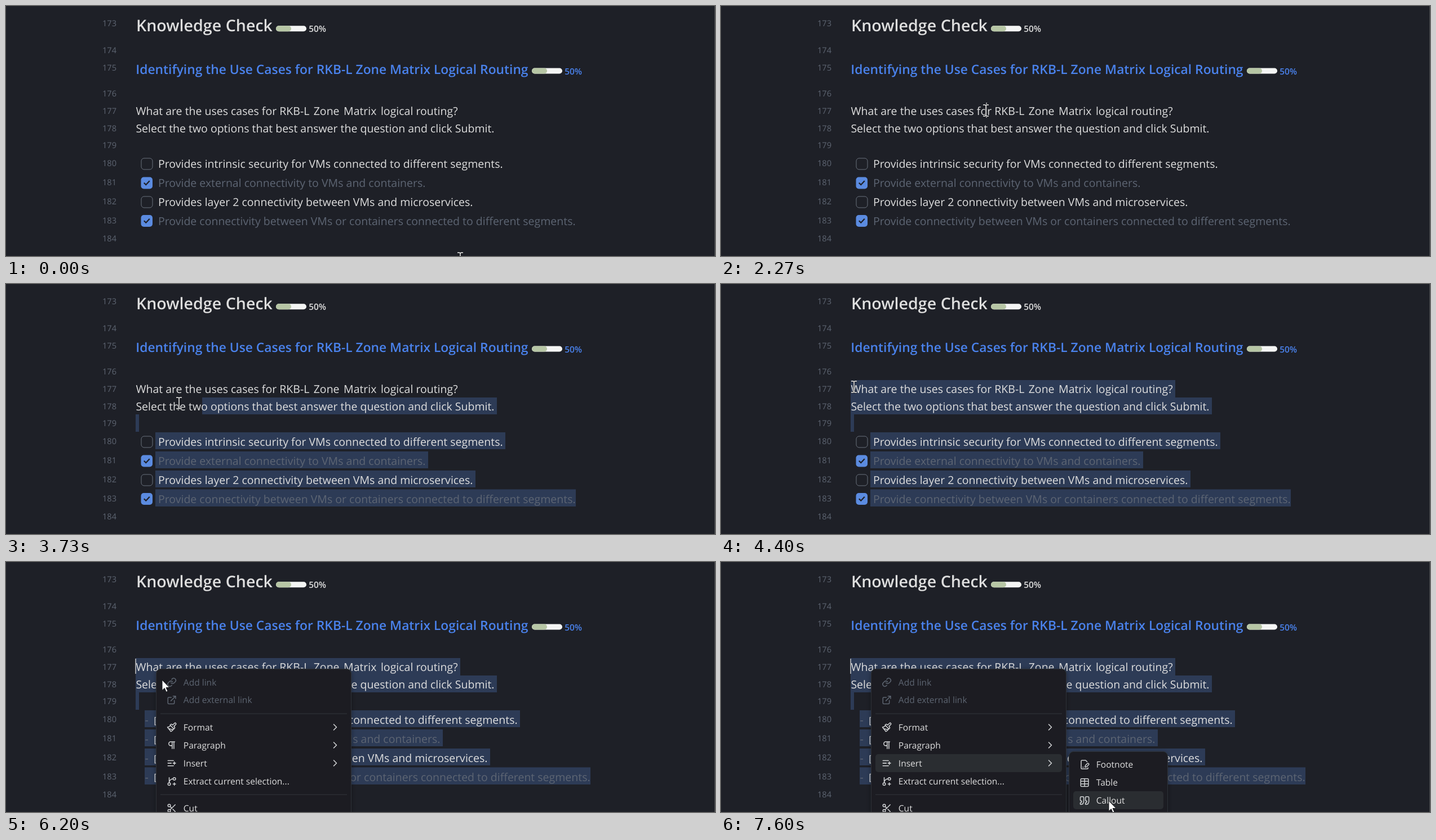
Write an HTML page that moves like this. It is 1258 by 445 pixels and loops after 8000 ms.

```html
<!DOCTYPE html>
<html lang="en">
<head>
<meta charset="utf-8">
<title>Knowledge check notes</title>
<style>
  html, body { margin: 0; width: 100%; height: 100%; overflow: hidden; background: #1e2027; }
  svg { display: block; width: 1258px; height: 445px; }
  text { font-family: "Open Sans", "Noto Sans", sans-serif; font-size: 19.5px; fill: #dedede;
         white-space: pre; text-rendering: geometricPrecision; }
  .num { font-size: 14.6px; fill: #5e6572; text-anchor: end; }
  .h1 { font-size: 28.6px; font-weight: 600; }
  .h2 { font-size: 22.8px; font-weight: 600; fill: #4a82ec; }
  .pct { font-size: 15.4px; font-weight: 600; }
  .pct.blue { fill: #4a82ec; }
  .name { word-spacing: 2.4px; }
  .dim { fill: #5d6573; }
  .mono { font-family: "Noto Sans Mono", "DejaVu Sans Mono", monospace; font-size: 17px; }
  .item { font-size: 15.55px; }
  .icon { fill: none; stroke: #d0d2d4; stroke-width: 2; stroke-linecap: round; stroke-linejoin: round; }
  .off { stroke: #5d6571; }
  text.off { fill: #5d6571; stroke: none; }
</style>
</head>
<body>
<svg id="stage" viewBox="0 0 1258 445">
  <defs>
    <filter id="shadow" x="-10%" y="-10%" width="120%" height="120%">
      <feDropShadow dx="0" dy="2" stdDeviation="5" flood-color="#000" flood-opacity=".35"/>
    </filter>
  </defs>
</svg>
<script>
const LOOP = 8000, STEP = 200 / 3;
const NS = "http://www.w3.org/2000/svg";
const stage = document.getElementById("stage");

function add(parent, tag, attrs, content) {
  const el = document.createElementNS(NS, tag);
  for (const key in attrs) el.setAttribute(key, attrs[key]);
  if (content) el.textContent = content;
  parent.appendChild(el);
  return el;
}
const group = parent => add(parent, "g", {});
const label = (parent, x, y, str, cls = "") => add(parent, "text", { x, y, class: cls }, str);
const box = (parent, x, y, width, height, fill, rx = 0) =>
  add(parent, "rect", { x, y, width, height, fill, rx });
const show = (el, on) => el.setAttribute("visibility", on ? "inherit" : "hidden");

// ---- document ----
const rows = [
  { top: 171, h: 31, x0: 230, x1: 806 },
  { top: 202, h: 30, x0: 230, x1: 871 },
  { top: 232, h: 31, x0: 230, x1: 236 },
  { top: 264, h: 30, x0: 265, x1: 886, task: "Provides intrinsic security for VMs connected to different segments." },
  { top: 298, h: 30, x0: 265, x1: 749, task: "Provide external connectivity to VMs and containers.", done: true },
  { top: 332, h: 30, x0: 265, x1: 833, task: "Provides layer 2 connectivity between VMs and microservices." },
  { top: 365.5, h: 30.5, x0: 265, x1: 1011, task: "Provide connectivity between VMs or containers connected to different segments.", done: true }
];
const marks = rows.map(r => box(stage, r.x0, r.top, 0, r.h, "#2d3b56"));

[31, 79, 110, 155.5, 187, 217.5, 248, 280, 314, 348, 382, 414].forEach((y, i) =>
  label(stage, 196, y + 5.2, String(173 + i), "num"));

function progress(x, y, cls) {
  box(stage, x, y - 5, 54, 10, "#f4f5f4", 5);
  box(stage, x, y - 5, 27, 10, "#b7c6a5", 5);
  label(stage, x + 58.3, y + 6, "50%", "pct " + cls);
}
const subject = "RKB-L Zone Matrix ";
label(stage, 230.9, 45.3, "Knowledge Check", "h1");
progress(479, 40.3, "");
label(stage, 230.3, 120.5, `Identifying the Use Cases for ${subject}Logical Routing`, "h2");
progress(933, 115.5, "blue");
const question = label(stage, 230.4, 194, "What are the uses cases for ");
add(question, "tspan", { class: "name" }, subject);
add(question, "tspan", {}, "logical routing?");
label(stage, 230.4, 225, "Select the two options that best answer the question and click Submit.");

const tasks = rows.filter(r => r.task).map(r => {
  const base = r.top + 24, mid = r.top + 17;
  const check = group(stage), raw = group(stage);
  if (r.done) {
    box(check, 239.5, mid - 10.5, 20.5, 21, "#5b8be0", 5);
    add(check, "path", { d: `M244.8 ${mid - .3}l3.5 3.5 6.5-7`, fill: "none", stroke: "#1e2027", "stroke-width": 2.2 });
  } else {
    add(check, "rect", { x: 240, y: mid - 10, width: 20, height: 20, rx: 5, fill: "none", stroke: "#69707c" });
  }
  label(raw, 246.5, base, "-", "dim");
  label(raw, 259.5, base - .5, r.done ? "[x]" : "[ ]", "mono");
  return { check, raw, text: label(stage, 270, base, r.task, r.done ? "dim" : "") };
});

const caret = box(stage, 229.5, 172, 1.3, 27, "#e2e2e2");

// ---- menus ----
const disc = (x, y) => `M${x} ${y - 3}a3 3 0 1 0 0 6 3 3 0 0 0 0-6z`;
const quote = x => `M${x} 21c3 0 7-1 7-8V5a2 2 0 0 0-2-2h-4a2 2 0 0 0-2 2v6a2 2 0 0 0 2 2h1c0 3 0 4-3 4v3a1 1 0 0 0 1 1z`;
const icons = {
  link: "M10 13a5 5 0 0 0 7.5.5l3-3a5 5 0 0 0-7-7l-1.7 1.7M14 11a5 5 0 0 0-7.5-.5l-3 3a5 5 0 0 0 7 7l1.7-1.7",
  open: "M15 3h6v6M10 14L21 3M18 13v6a2 2 0 0 1-2 2H5a2 2 0 0 1-2-2V8a2 2 0 0 1 2-2h6",
  brush: "M14.6 17.9L4 15M18.4 2.6a1.5 1.5 0 0 1 3 3l-4.4 4.4 1.3 1.3a2.4 2.4 0 0 1 0 3.4L17 16 8 7l1.3-1.3a2.4 2.4 0 0 1 3.4 0L14 7zM9 8c-1.8 2.7-4 3.5-7 4l8 10c2.7-1.6 6-5.2 6-7",
  pilcrow: "M13 4v16M17 4v16M19 4H9.5a4.5 4.5 0 0 0 0 9H13",
  insert: "M11 12H3M16 6H3M16 18H3M18 9v6M21 12h-6",
  branch: "M6 3v12M15 6a9 9 0 0 0-9 9M18 15v6M21 18h-6" + disc(18, 6) + disc(6, 18),
  cut: disc(6, 6) + disc(6, 18) + "M20 4L8.1 15.9M14.5 14.5L20 20M8.1 8.1L12 12",
  note: "M20 19.5v.5a2 2 0 0 1-2 2H6a2 2 0 0 1-2-2V4a2 2 0 0 1 2-2h8.5L18 5.5M8 18h1M18.4 9.6a2 2 0 1 1 3 3L17 17l-4 1 1-4z",
  table: "M12 3v18M3 9h18M3 15h18M5 3h14a2 2 0 0 1 2 2v14a2 2 0 0 1-2 2H5a2 2 0 0 1-2-2V5a2 2 0 0 1 2-2z",
  quote: quote(3) + quote(15)
};

function panel(x, y, w, h) {
  const g = group(stage);
  add(g, "rect", { x: x + .5, y: y + .5, width: w - 1, height: h, rx: 8,
    fill: "#1a1d20", stroke: "#2f3338", filter: "url(#shadow)" });
  const hover = box(g, x + 8, y, w - 16, 32, "#2a2d31", 5);
  return { g, hover, x };
}
function item(menu, y, icon, str, off = "") {
  add(menu.g, "path", { d: icons[icon], class: "icon " + off,
    transform: `translate(${menu.x + 19} ${y - 9}) scale(.76)` });
  label(menu.g, menu.x + 48.8, y + 5.6, str, "item " + off);
}
const menu = panel(266, 190, 347, 300);
item(menu, 214, "link", "Add link", "off");
item(menu, 245.5, "open", "Add external link", "off");
item(menu, 294, "brush", "Format");
item(menu, 326, "pilcrow", "Paragraph");
item(menu, 358, "insert", "Insert");
item(menu, 390.5, "branch", "Extract current selection...");
item(menu, 438, "cut", "Cut");
[270, 414].forEach(y => box(menu.g, 274, y - .5, 331, 1, "#33373c"));
[294, 326, 358].forEach(y =>
  add(menu.g, "path", { d: `M581.5 ${y - 5}l5 5-5 5`, class: "icon", style: "stroke-width: 1.6" }));

const sub = panel(617, 337, 176, 200);
item(sub, 360.5, "note", "Footnote");
item(sub, 392.5, "table", "Table");
item(sub, 424.5, "quote", "Callout");

box(stage, 1257, 0, 1, 445, "#4b4c50");

// ---- pointers ----
const beam = group(stage), arrow = group(stage);
const beamPath = "M-5-10H-1.5L0-9 1.5-10H5M0-9V9M-5 10H-1.5L0 9 1.5 10H5";
[["#15171b", 3], ["#f2f2f2", 1.5]].forEach(([stroke, w]) =>
  add(beam, "path", { d: beamPath, fill: "none", stroke, "stroke-width": w }));
add(arrow, "path", { d: "M0 0V18.5L4.3 14.5 7.2 21.3 10 20.1 7.1 13.5H13Z",
  fill: "#fff", stroke: "#15171b", "stroke-width": 1 });

// time, x, y
const path = [
  [0, 806, 449], [1600, 542, 354], [1733, 500, 260], [1933, 471, 186], [2267, 470, 186],
  [2467, 436, 212], [2667, 640, 275], [2867, 930, 362], [3067, 1017, 390], [3200, 1018, 388],
  [3333, 1012, 386], [3400, 991, 383], [3467, 931, 375], [3533, 780, 340], [3667, 347, 219],
  [3733, 307, 212], [3800, 270, 196], [3867, 236, 178], [3933, 236, 175], [4000, 235, 175],
  [4200, 236, 183], [5000, 236, 183], [5067, 235, 185], [5333, 235, 185], [5600, 265, 188],
  [5867, 265, 188], [5933, 266, 190], [6133, 266, 190], [6333, 300, 250], [6467, 345, 325],
  [6600, 365, 352], [6733, 369, 357], [6933, 369, 357], [7200, 520, 360], [7333, 630, 368],
  [7467, 680, 405], [7600, 688, 425], [8000, 688, 425]
];
function pointer(t) {
  const i = Math.max(1, path.findIndex(p => p[0] >= t));
  const [t0, x0, y0] = path[i - 1], [t1, x1, y1] = path[i];
  const k = (t - t0) / (t1 - t0);
  return [x0 + (x1 - x0) * k, y0 + (y1 - y0) * k];
}

// The selection head trails the pointer by one step until the drag ends.
function select(t, raw) {
  const [x, y] = pointer(Math.min(t, 3933) - STEP);
  const head = Math.max(0, rows.filter(r => r.top <= y).length - 1);
  rows.forEach((r, i) => {
    const shift = raw && r.task;
    const x0 = r.x0 - (shift ? 19 : 0), x1 = r.x1 + (shift ? 26 : 0);
    const from = i === head && x > r.x0 + 8 ? Math.min(x, x1) : x0;
    marks[i].setAttribute("x", from);
    marks[i].setAttribute("width", t > 3130 && i >= head ? x1 - from : 0);
  });
}

function hover({ hover: bar }, centers, y) {
  const c = centers.find(v => Math.abs(v - y) <= 16);
  show(bar, c !== undefined);
  if (c !== undefined) bar.setAttribute("y", c - 16);
}

function draw(time) {
  const t = Math.floor(time / STEP + .06) * STEP;
  const [x, y] = pointer(t);
  const raw = t > 5460, menuOpen = t > 5930, subOpen = t > 6660;

  select(t, raw);
  tasks.forEach(k => {
    show(k.check, !raw);
    show(k.raw, raw);
    k.text.setAttribute("x", raw ? 296 : 270);
  });

  const clicked = t > 2060 && t < 2660;
  const blink = t > 3930 && Math.floor((t - 3799) / 600) % 2 === 0;
  show(caret, clicked || blink);
  caret.setAttribute("x", clicked ? 470.4 : 229.4);

  show(menu.g, menuOpen);
  show(sub.g, subOpen);
  const inSub = subOpen && x > 617;
  hover(menu, [294, 326, 358, 390], inSub ? 358 : y);
  hover(sub, [360, 392, 424], inSub ? y : -99);
  if (!menuOpen) show(menu.hover, false);

  show(beam, t < 60 || (t > 1590 && !menuOpen));
  show(arrow, menuOpen);
  const place = `translate(${Math.round(x)} ${Math.round(y)})`;
  beam.setAttribute("transform", place);
  arrow.setAttribute("transform", place);
}

const start = performance.now();
function tick(now) {
  draw(Math.max(0, now - start) % LOOP);
  requestAnimationFrame(tick);
}
draw(0);
requestAnimationFrame(tick);
</script>
</body>
</html>
```
